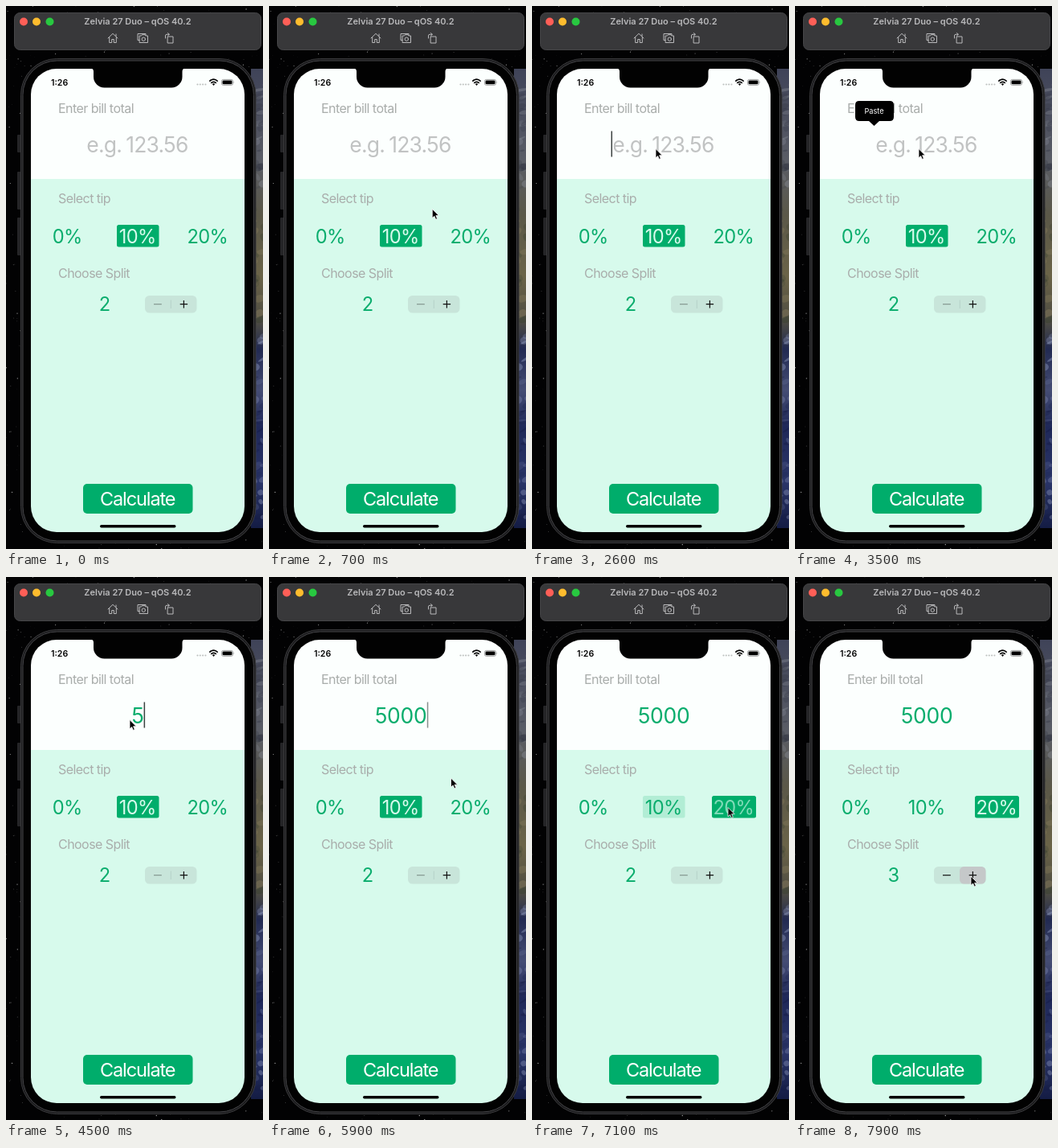
An HTML page for the animation above (8 s loop, 320 by 675 pixels).

```html
<!DOCTYPE html>
<html lang="en">
<head>
<meta charset="utf-8">
<title>Tip calculator demo</title>
<style>
html, body { margin: 0; width: 100%; height: 100%; overflow: hidden; background: #000; }
svg { display: block; width: 100%; height: 100%; }
text { font-family: Inter, Roboto, sans-serif; font-weight: 400; }
.bold { font-weight: 600; }
.label { font-size: 16px; letter-spacing: -.55px; fill: #a9adab; }
.tip { font-size: 23.7px; letter-spacing: -.7px; fill: #0aad6d; text-anchor: middle; }
.field { font-size: 26.5px; text-anchor: middle; }
</style>
</head>
<body>
<svg viewBox="0 0 320 675" preserveAspectRatio="none">
  <defs>
    <linearGradient id="land" x2="0" y2="1">
      <stop offset="0" stop-color="#3f4358"/>
      <stop offset=".2" stop-color="#5a5d66"/>
      <stop offset=".32" stop-color="#5b5848"/>
      <stop offset=".45" stop-color="#6b6448"/>
      <stop offset=".55" stop-color="#4e4c42"/>
      <stop offset=".61" stop-color="#222a52"/>
      <stop offset=".7" stop-color="#454d74"/>
      <stop offset=".78" stop-color="#1f2859"/>
      <stop offset=".9" stop-color="#2a3568"/>
      <stop offset="1" stop-color="#141c44"/>
    </linearGradient>
    <clipPath id="planet"><rect x="305" y="78" width="15" height="571"/></clipPath>
    <clipPath id="screen"><rect x="31" y="78" width="266" height="576" rx="32"/></clipPath>
  </defs>

  <rect width="320" height="675" fill="#020203"/>
  <g id="stars" fill="#fff"></g>
  <rect x="305" y="78" width="15" height="571" fill="url(#land)"/>
  <g id="clouds" clip-path="url(#planet)"></g>

  <!-- simulator title bar -->
  <rect x="10.5" y="8.5" width="307" height="46" rx="7" fill="#38383a" stroke="#464648"/>
  <circle cx="22" cy="19.5" r="5" fill="#ff5f57"/>
  <circle cx="38" cy="19.5" r="5" fill="#febc2e"/>
  <circle cx="54.5" cy="19.5" r="5" fill="#28c840"/>
  <text class="bold" x="164" y="23" font-size="11" text-anchor="middle" fill="#b9b9bb">Zelvia 27 Duo – qOS 40.2</text>
  <g fill="none" stroke="#b9b9bb" stroke-linejoin="round" stroke-linecap="round">
    <path d="M127 40l6-5.7 6 5.7M128.7 39v6.5h3v-4h2.6v4h3v-6.5M137 35v2.5"/>
    <path d="M166 42.5h-2v-8h10v2M166.500 37h2l1-1.300h3.500l1 1.300h2.500v8.500h-10z"/>
    <circle cx="171.3" cy="41.2" r="2.2"/>
    <path d="M201.5 38h6.500v8h-6.500zM198.500 40v-3q0-1.700 1.700-1.700h3M201.500 33.600l1.800 1.700-1.800 1.700"/>
  </g>

  <!-- phone body -->
  <g fill="#252527">
    <rect x="14" y="160" width="5" height="22" rx="1"/>
    <rect x="14" y="206" width="5" height="47" rx="1"/>
    <rect x="14" y="263" width="5" height="47" rx="1"/>
  </g>
  <rect x="18.5" y="65.5" width="292.5" height="602" rx="45" fill="#1a1a1c" stroke="#3a3a3c"/>
  <rect x="21" y="68" width="287.5" height="597" rx="42.5" fill="#020202" stroke="#444447"/>

  <g clip-path="url(#screen)">
    <rect x="31" y="78" width="266" height="137" fill="#fcfffe"/>
    <rect x="31" y="215" width="266" height="440" fill="#d7faec"/>
  </g>
  <path d="M105 77.500q4 0 4 4v6.500a13.500 13.500 0 0 0 13.500 13.500h83.500a13.500 13.500 0 0 0 13.500-13.500v-6.500q0-4 4-4z" fill="#020202"/>
  <rect x="117" y="645" width="94.5" height="3.4" rx="1.7" fill="#000"/>

  <!-- status bar -->
  <text class="bold" x="56" y="99" font-size="10.6">1:26</text>
  <g fill="#bfc2c1">
    <circle cx="238.5" cy="97.5" r="1.1"/><circle cx="241.8" cy="97.5" r="1.1"/>
    <circle cx="245.1" cy="97.5" r="1.1"/><circle cx="248.4" cy="97.5" r="1.1"/>
  </g>
  <path d="M253.300 93.600q5.200-4.800 10.400 0M255.200 95.800q3.300-3 6.600 0" fill="none" stroke="#000" stroke-width="1.6"/>
  <path d="M256.800 97q1.700-1.300 3.400 0l-1.700 1.900z"/>
  <rect x="268.4" y="91.4" width="14.2" height="7" rx="2.2" fill="none" stroke="#8d9090" stroke-width=".8"/>
  <rect x="269.5" y="92.5" width="12" height="4.8" rx="1.3"/>
  <path d="M283.600 93.600q1.300 1.300 0 2.600z" fill="#8d9090"/>

  <!-- form -->
  <text class="label" x="65" y="133">Enter bill total</text>
  <text class="label" x="65" y="245">Select tip</text>
  <text class="label" x="65" y="338">Choose Split</text>
  <text id="hint" class="field" x="163.5" y="181.5" letter-spacing="-.8" word-spacing="-1.5" fill="#c1c3c3">e.g. 123.56</text>
  <text id="bill" class="field" x="164" y="181.5" letter-spacing="-.3" fill="#0aad6d"></text>
  <rect id="caret" y="155.5" width="1.5" height="32" fill="#3d4341"/>

  <rect id="bg10" x="138" y="272" width="52.5" height="27.5" rx="2.5" fill="#00ad6b"/>
  <rect id="bg20" x="224" y="272" width="55" height="27.5" rx="2.5" fill="#00ad6b"/>
  <text class="tip" x="76.2" y="294.5">0%</text>
  <text id="tip10" class="tip" x="163.7" y="294.5">10%</text>
  <text id="tip20" class="tip" x="250.7" y="294.5">20%</text>

  <text id="split" class="tip" x="122.5" y="378.5"></text>
  <rect x="173" y="360" width="64.5" height="21.5" rx="5.5" fill="#c8e5da"/>
  <rect id="press" x="205" y="360" width="32.5" height="21.5" rx="5.5" fill="#c5c8c9"/>
  <path id="rule" d="M205.300 365.500v10.500" stroke="#b3cdc3" stroke-width=".8"/>
  <path id="minus" d="M184 370.700h9.800" stroke-width="1.2"/>
  <path d="M216.700 370.700h9.400M221.400 366v9.400" stroke="#111" stroke-width="1.2"/>

  <rect x="96" y="594" width="136.5" height="37" rx="5" fill="#00ad6b"/>
  <text x="163.7" y="621" font-size="23.5" letter-spacing="-1.1" text-anchor="middle" fill="#fff">Calculate</text>

  <g id="menu">
    <path d="M80 118h38q5 0 5 5v15q0 5-5 5h-13l-6.500 6-6.500-6h-12q-5 0-5-5v-15q0-5 5-5z"/>
    <text x="98.5" y="133.7" font-size="9.2" text-anchor="middle" fill="#fff">Paste</text>
  </g>

  <path id="arrow" d="M0 0v11.300l2.600-2.400 1.800 4 1.900-.8-1.700-3.900h3.600z" stroke="#fff" stroke-width=".8" stroke-linejoin="round"/>
</svg>

<script>
const LOOP = 8000, STEP = 100;
const GREEN = "#0aad6d", MINT = "#d7faec";
const el = Object.fromEntries([...document.querySelectorAll("[id]")].map(e => [e.id, e]));
const ramp = (t, a, b) => Math.min(1, Math.max(0, (t - a) / (b - a)));
const lastOf = (list, t) => list.filter(k => k[0] <= t).pop();

function add(parent, tag, attrs) {
  const node = document.createElementNS("http://www.w3.org/2000/svg", tag);
  for (const k in attrs) node.setAttribute(k, attrs[k]);
  parent.append(node);
}

let seed = 11;
const rnd = () => (seed = seed * 16807 % 2147483647) / 2147483647;

for (let i = 0; i < 900; i++) {
  const bright = rnd();
  add(el.stars, "circle", {
    cx: rnd() * 320, cy: rnd() * 675,
    r: .25 + bright * bright * .45, opacity: .2 + bright * .45
  });
}
for (let i = 0; i < 80; i++) {
  const y = 85 + rnd() * 560;
  const light = rnd() < .5;
  const tone = y < 240 ? (light ? "#8a8e99" : "#2f3240")
    : y < 400 ? (light ? "#8f8460" : "#38412f")
    : light ? "#8d97bb" : "#121940";
  add(el.clouds, "ellipse", {
    cx: 306 + rnd() * 16, cy: y, rx: 2 + rnd() * 6, ry: 1 + rnd() * 4,
    fill: tone, opacity: .15 + rnd() * .3, transform: `rotate(${-35 + rnd() * 30} 314 ${y})`
  });
}

// [time, x, y]; the pointer jumps between screen refreshes
const pointer = [
  [1100, 176, 155], [1200, 175.5, 160], [1300, 175, 166], [1400, 174, 170], [1500, 173.5, 172.5],
  [1800, 167, 173.5], [2300, 157, 179], [2400, 154, 177.5], [5900, 226.5, 250],
  [6100, 245, 275], [6200, 274, 310], [6300, 290, 328], [6400, 286, 330], [6500, 269, 312],
  [6600, 252, 294], [6700, 244, 286.5], [7300, 242, 302], [7400, 236, 338], [7500, 228, 370],
  [7600, 222, 382], [7700, 219, 372]
];
const typed = [[0, ""], [4400, "5"], [4700, "50"], [5000, "500"], [5400, "5000"]];
const blink = [
  [0, 0], [2600, 1], [3200, .6], [3300, .2], [3400, 0], [3800, .5], [3900, 1],
  [5900, .6], [6100, 0], [6500, .5], [6600, 1], [6900, 0]
];

function pointerAt(t) {
  if (t >= 1100) return lastOf(pointer, t).slice(1);
  const p = 1 - (1 - ramp(t, 200, 1100)) ** 2;
  return [314 - 138 * p, 648 - 493 * p];
}

function draw(now) {
  const t = Math.floor(now % LOOP / STEP) * STEP;
  const bill = lastOf(typed, t)[1];
  const [x, y] = pointerAt(t);

  el.arrow.setAttribute("transform", `translate(${x} ${y})`);
  el.arrow.style.opacity = t < 200 ? 0 : 1;

  el.bill.textContent = bill;
  el.hint.style.opacity = bill ? 0 : 1;
  el.caret.setAttribute("x", bill ? 171.6 + 8.4 * (bill.length - 1) : 98.5);
  el.caret.style.opacity = lastOf(blink, t)[1];
  el.menu.style.opacity = ramp(t, 3100, 3500) * (1 - ramp(t, 4200, 4400));

  const chosen20 = t >= 7000;
  const pressed20 = t >= 6900 && t < 7300;
  el.bg10.style.opacity = (1 - ramp(t, 6900, 7200)) ** 1.6;
  el.bg20.style.opacity = chosen20 ? 1 : 0;
  el.tip10.style.fill = chosen20 ? GREEN : MINT;
  el.tip20.style.fill = chosen20 ? MINT : GREEN;
  el.tip20.style.opacity = pressed20 ? .6 : 1;

  const stepped = t >= 7800;
  el.split.textContent = stepped ? 3 : 2;
  el.press.style.opacity = ramp(t, 7700, 7900);
  el.rule.style.opacity = stepped ? 0 : 1;
  el.minus.setAttribute("stroke", stepped ? "#111" : "#84978f");
}

const start = performance.now();
function tick() {
  draw(performance.now() - start);
  requestAnimationFrame(tick);
}
tick();
</script>
</body>
</html>
```
